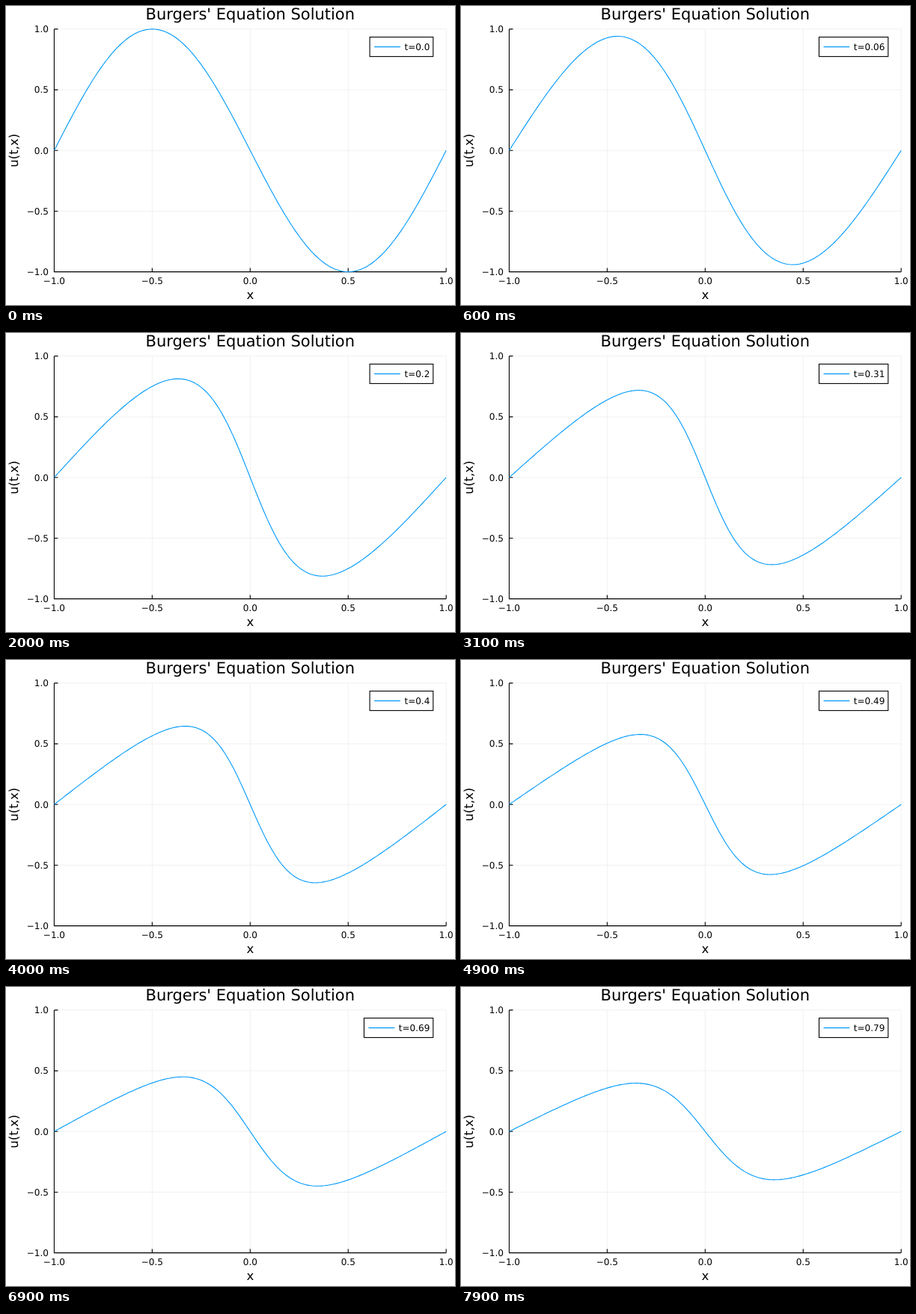
An HTML page for the animation above (8000 ms loop, 600 by 400 pixels).

```html
<!DOCTYPE html>
<html lang="en">
<head>
<meta charset="utf-8">
<title>Burgers' Equation Solution</title>
<style>
  html, body { margin: 0; width: 100%; height: 100%; overflow: hidden; background: #fff; }
  svg { display: block; }
  text { font: 12px "DejaVu Sans", sans-serif; text-rendering: geometricPrecision; }
  .mid { text-anchor: middle; }
  .end { text-anchor: end; }
  .label { font-size: 16.5px; }
  .title { font-size: 21px; }
  .grid { stroke: #000; stroke-opacity: .1; stroke-width: .6; }
  .axis { stroke: #000; stroke-width: 1.1; fill: none; }
  .curve { stroke: #009afa; stroke-width: 1.1; fill: none; stroke-linejoin: round; }
</style>
</head>
<body>
<svg width="600" height="400" viewBox="0 0 600 400">
  <path id="grid" class="grid"/>
  <path id="axes" class="axis"/>
  <g id="ticks"></g>
  <text class="mid title" x="326.3" y="18">Burgers' Equation Solution</text>
  <text class="mid label" x="326.3" y="391.7">x</text>
  <text class="mid label" transform="translate(16.3 193.3) rotate(-90)">u(t,x)</text>
  <path id="wave" class="curve"/>
  <rect id="box" class="axis" y="41.6" height="26" style="fill:#fff"/>
  <path id="sample" class="curve"/>
  <text id="time" x="566.3" y="59.2" class="end"></text>
</svg>
<script>
const LEFT = 64.4, RIGHT = 588.2, TOP = 30.9, BOTTOM = 355.6;
const NU = 0.103, TERMS = 14, STEP = 100, STEPS = 80;
const el = id => document.getElementById(id);
const px = x => LEFT + (x + 1) / 2 * (RIGHT - LEFT);
const py = u => BOTTOM - (u + 1) / 2 * (BOTTOM - TOP);

function drawFrame() {
  let grid = "", axes = `M${LEFT} ${TOP}V${BOTTOM}H${RIGHT}`, labels = "";
  for (const v of [-1, -.5, 0, .5, 1]) {
    const x = px(v), y = py(v), text = v.toFixed(1).replace("-", "\u2212");
    grid += `M${x} ${TOP}V${BOTTOM}M${LEFT} ${y}H${RIGHT}`;
    axes += `M${x} ${BOTTOM}v-5M${LEFT} ${y}h5`;
    labels += `<text class="mid" x="${x}" y="371.7">${text}</text>` +
              `<text class="end" x="56.9" y="${y + 4.3}">${text}</text>`;
  }
  el("grid").setAttribute("d", grid);
  el("axes").setAttribute("d", axes);
  el("ticks").innerHTML = labels;
}

// Modified Bessel function of the first kind, by its power series
function bessel(n, z) {
  let term = 1, sum = 0;
  for (let k = 1; k <= n; k++) term *= z / 2 / k;
  for (let k = 1; k < 20; k++) {
    sum += term;
    term *= z * z / 4 / (k * (k + n));
  }
  return sum;
}

const weights = Array.from({ length: TERMS }, (_, n) =>
  (n ? 2 : 1) * (-1) ** n * bessel(n, 1 / (2 * Math.PI * NU)));

// Cole-Hopf solution for u(0,x) = -sin(pi x)
function solution(t) {
  const modes = weights.map((w, n) => w * Math.exp(-NU * (n * Math.PI) ** 2 * t));
  return x => {
    let phi = 0, slope = 0;
    modes.forEach((m, n) => {
      phi += m * Math.cos(n * Math.PI * x);
      slope += n * m * Math.sin(n * Math.PI * x);
    });
    return 2 * NU * Math.PI * slope / phi;
  };
}

function show(step) {
  const t = step / 100, u = solution(t), points = [];
  for (let i = -100; i <= 100; i++)
    points.push(px(i / 100).toFixed(2) + " " + py(u(i / 100)).toFixed(2));
  el("wave").setAttribute("d", "M" + points.join("L"));

  const text = "t=" + (step ? t : "0.0");
  const left = 486.1 - (text.length - 5) * 7.63;
  el("time").textContent = text;
  el("box").setAttribute("x", left);
  el("box").setAttribute("width", 570.8 - left);
  el("sample").setAttribute("d", `M${left + 6} 54.6h34.8`);
}

let shown = -1;
const start = performance.now();
function tick() {
  const step = Math.floor((performance.now() - start) / STEP) % STEPS;
  if (step !== shown) show(shown = step);
  requestAnimationFrame(tick);
}
drawFrame();
tick();
</script>
</body>
</html>
```
